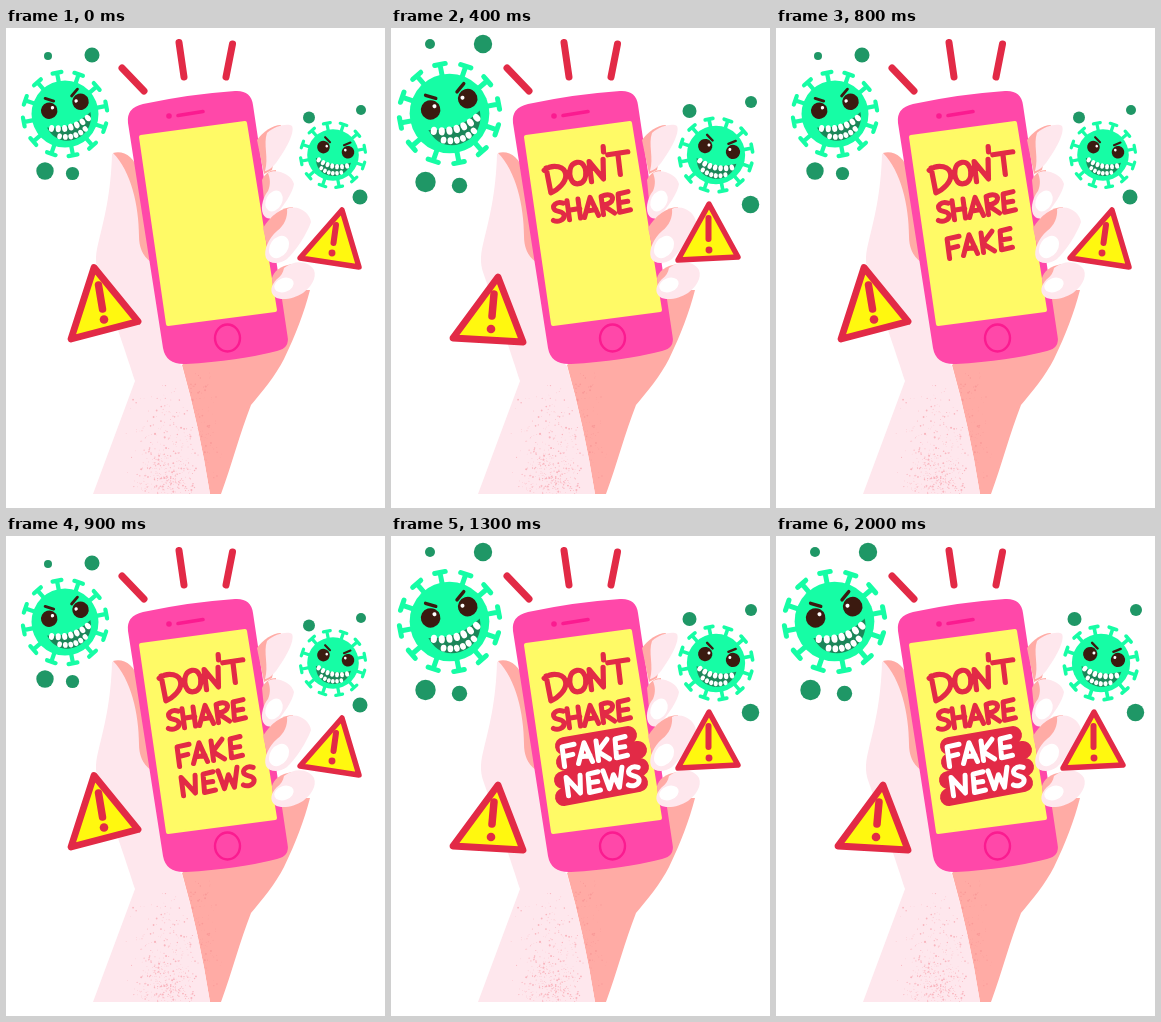
An HTML page with a canvas that plays this animation: 379 by 480 pixels, repeating every 2.4 s.

```html
<!DOCTYPE html>
<html lang="en">
<head>
<meta charset="utf-8">
<title>Don't share fake news</title>
<style>
html, body { margin: 0; width: 100%; height: 100%; overflow: hidden; background: #fff; }
canvas { display: block; width: 100vw; height: 100vh; }
</style>
</head>
<body>
<canvas id="stage" width="379" height="480" role="img" aria-label="Don't share fake news"></canvas>
<script>
const ctx = document.getElementById('stage').getContext('2d');
const LOOP = 2400, POSE = 400;
const RED = '#e22a46', PINK = '#ff48a9', HOT = '#fb1b90', YELLOW = '#fffa66',
  SIGN = '#fff80f', LIGHT = '#fee7ed', SALMON = '#ffaba5', MINT = '#16fda5',
  GREEN = '#1f9766', BROWN = '#3b1a10', MOUTH = '#1b8659', WHITE = '#fff';

ctx.lineCap = ctx.lineJoin = 'round';

function fill(d, color) {
  ctx.fillStyle = color;
  ctx.fill(new Path2D(d));
}

function stroke(d, color, width) {
  ctx.strokeStyle = color;
  ctx.lineWidth = width;
  ctx.stroke(new Path2D(d));
}

function oval(x, y, rx, ry, color, turn = 0) {
  ctx.fillStyle = color;
  ctx.beginPath();
  ctx.ellipse(x, y, rx, ry, turn, 0, Math.PI * 2);
  ctx.fill();
}

const dot = (x, y, r, color) => oval(x, y, r, r, color);
const turn = degrees => ctx.rotate(degrees * Math.PI / 180);

function seeded(seed) {
  return () => (seed = (seed * 16807) % 2147483647) / 2147483647;
}

// Hand
const ARM = 'M106 126C110 123 118 128 124 142L150 240L162 325L176 338Q193 397 204 466H87L129 353C121 328 108 290 93 247C88 234 90 224 93 212C98 192 105 165 106 126Z';
const PALM = 'M176 337L270 262L304 262C298 285 290 306 278 331C270 347 256 364 245 377C234 405 226 436 215 466H204Q193 397 176 337Z';

function speckle(area, color, count, seed, place) {
  const rnd = seeded(seed);
  ctx.save();
  ctx.clip(new Path2D(area));
  for (let i = 0; i < count; i++) {
    const [x, y] = place(rnd);
    dot(x, y, 0.3 + 0.9 * rnd() * rnd(), color);
  }
  ctx.restore();
}

function drawHand() {
  fill(PALM, SALMON);
  fill(ARM, LIGHT);
  fill('M107 125C118 122 128 129 133 144C138 165 140 195 145 234C136 228 133 218 133 208C133 178 125 143 107 125Z', SALMON);
  speckle(ARM, '#f9b6bf', 420, 71, r => {
    const y = 355 + 111 * Math.sqrt(r());
    return [120 + 40 * (r() + r()), y];
  });
  speckle(PALM, '#f99a98', 90, 29, r => {
    const y = 345 + 105 * r();
    return [180 + (y - 345) * 0.23 + 32 * r() * r(), y];
  });
}

function drawFingers() {
  fill('M251 112C257 104 266 97 275 97L266 142L258 146Z', SALMON);
  fill('M261 105C269 97 283 95 286 98C289 104 281 120 270 135C265 141 261 143 259 143C263 130 257 116 261 105Z', LIGHT);

  fill('M256 152C259 145 265 142 270 142L268 168L258 172Z', SALMON);
  fill('M262 145C271 140 286 147 288 156C287 165 277 178 271 186C267 192 260 192 257 186C254 178 258 168 262 163C265 156 264 150 262 145Z', LIGHT);
  oval(268, 173, 8, 11, WHITE, 0.5);

  fill('M257 200C264 188 276 179 287 179L278 216L262 222Z', SALMON);
  fill('M281 181C292 176 304 185 305 194C301 206 289 224 281 231C273 237 263 236 260 230C257 222 263 210 271 203C278 198 282 189 281 181Z', LIGHT);
  oval(273, 219, 9, 12, WHITE, 0.6);

  fill('M266 250C268 243 274 238 286 236L278 256L267 264Z', SALMON);
  fill('M278 240C289 231 303 233 308 242C311 250 305 259 297 265C288 271 275 273 269 269C263 264 265 257 271 251C275 248 277 245 278 240Z', LIGHT);
  oval(278, 257, 10, 7, WHITE, -0.35);
}

function drawPhone() {
  const screen = 'M135 109L239 95L269 282L162 296Z';
  fill('M137 76Q184 66 229 63Q245 62 247 77L281.5 308Q284 320 271 323Q232 333 180 336Q160 337 157 320L122 95Q120 80 137 76Z', PINK);
  stroke(screen, YELLOW, 4);
  fill(screen, YELLOW);
  dot(163, 88, 2.8, HOT);
  stroke('M172 87.5L197 83.5', HOT, 3.6);
  ctx.lineWidth = 2.4;
  ctx.beginPath();
  ctx.ellipse(221.5, 310, 12.5, 13.5, 0, 0, Math.PI * 2);
  ctx.stroke();
  stroke('M116 40L138 63M173 14.5L178 49M226.5 16L220 49', RED, 7);
}

// Brush lettering, each glyph about 22 units tall
const GLYPHS = {
  D: 'M0 1L3 27M-2 3C8 -3 19 3 19 11C19 18 11 25 3 27',
  O: 'M8 0C2 0 0 6 0 11C0 17 3 22 8 22C14 22 16 16 16 11C16 5 13 0 8 0Z',
  N: 'M1 22L0 1L13 21L14 1',
  "'": 'M0 -12L0 -6.5',
  T: 'M-1 -3L19 -3M9 -3L10 19',
  S: 'M11 2C4 -2 -1 4 2 8C4 11 11 11 11 16C11 22 4 23 0 20',
  H: 'M0 0L1 22M11 0L12 22M1 11L12 11',
  A: 'M-1 22L6 0L13 22M2 15L11 15',
  R: 'M1 22L0 1C8 -2 12 2 11 6C10 10 5 11 1 11L12 22',
  E: 'M11 0L1 1L1 22L12 21M1 11L10 11',
  F: 'M12 0L0 1L1 23M1 12L10 11',
  K: 'M0 0L1 22M11 0L1 12L12 22',
  W: 'M0 0L5 21L10 6L15 21L19 -1'
};
const SLOPE = -0.15;

function word(text, y, tall, xs) {
  const path = new Path2D();
  xs.forEach((x, i) => {
    const m = new DOMMatrix([1, SLOPE, 0.07, tall, x, y + SLOPE * (x - xs[0])]);
    path.addPath(new Path2D(GLYPHS[text[i]]), m);
  });
  return path;
}

const DONT = word("DON'T", 139, 0.97, [155, 178, 198, 213, 218]);
const SHARE = word('SHARE', 175, 0.87, [161, 176, 193, 210, 226]);
const FAKE = word('FAKE', 210, 0.9, [171, 187, 205, 223]);
const NEWS = word('NEWS', 240.5, 0.88, [175, 196, 212, 236]);

function drawText(t) {
  const marked = t >= 1300;
  const ink = marked ? WHITE : RED;
  if (marked) {
    stroke('M173 210L237 199M174 226L247 214M172 244L249 231M173 261L248 247', RED, 18);
  }
  if (t >= 200) {
    stroke(DONT, RED, 5.2);
    stroke(SHARE, RED, 5);
  }
  if (t >= 600) stroke(FAKE, ink, 5);
  if (t >= 900) stroke(NEWS, ink, 5);
}

function teeth(n, x0, x1, curve, rx, ry) {
  for (let i = 0; i < n; i++) {
    const u = (i + 0.5) / n, v = 2 * u - 1;
    oval(x0 + (x1 - x0) * u, curve(v), rx, ry, WHITE, -v * 0.5);
  }
}

function virus(x, y, scale, tilt) {
  ctx.save();
  ctx.translate(x, y);
  ctx.scale(scale, scale);
  for (let i = 0; i < 12; i++) {
    ctx.save();
    turn(19 + i * 30);
    stroke('M28 0L41 0M42 -4.5L42 4.5', MINT, 4.2);
    ctx.restore();
  }
  dot(0, 0, 33.5, MINT);

  turn(tilt);
  for (const side of [-1, 1]) {
    const ex = 2 + side * 16.3;
    dot(ex, -7.5, 8.2, BROWN);
    dot(ex - side * 4, -9.5, 1.7, WHITE);
    stroke(`M${ex + side * 0.5} -20.5L${ex - side * 7} -15.5`, BROWN, 2.8);
  }
  fill('M-21 8Q3 17 25 5C24 18 14 27 1 27C-11 27 -19 19 -21 8Z', MOUTH);
  teeth(7, -20, 24, v => 14.2 - 5.5 * v * v, 2.6, 3.5);
  teeth(6, -14, 18, v => 23.4 - 5 * v * v, 2.4, 2.9);
  ctx.restore();
}

function sign(triangle, bar, x, y, size) {
  fill(triangle, SIGN);
  stroke(triangle, RED, 6.8 * size);
  stroke(bar, RED, 7.5 * size);
  dot(x, y, 4.3 * size, RED);
}

const POSES = [
  {
    viruses: [[59, 86, 1, -16], [327, 127, 0.77, 12]],
    dots: [[42, 28, 4], [86, 27, 7.5], [39, 143, 8.7], [66.5, 145.5, 6.6],
      [303, 89.5, 6], [355, 82, 5], [354, 169, 7.5]],
    signs: [
      ['M88 239.5L132 293.5L65 311Z', 'M92.5 257L96.5 281', 98, 291.5, 1],
      ['M336 182L353 239L294 230Z', 'M330 197L327.5 215', 326, 225, 0.8]
    ]
  },
  {
    viruses: [[58.5, 85.5, 1.19, -17], [325, 127, 0.87, 12]],
    dots: [[39, 16, 5], [92, 16, 9.2], [34.5, 154, 10.2], [68.5, 157.5, 7.7],
      [298.5, 83, 7], [360, 74, 6], [359.5, 176.5, 8.7]],
    signs: [
      ['M107 249L132 314L62 310Z', 'M103 266L101 288', 100, 301, 1],
      ['M318 176L347 229L287 232Z', 'M317.5 190L317.5 211', 318, 222, 0.8]
    ]
  }
];

function draw(t) {
  const pose = POSES[Math.floor(t / POSE) % 2];
  ctx.fillStyle = WHITE;
  ctx.fillRect(0, 0, 379, 480);
  drawHand();
  drawPhone();
  drawFingers();
  drawText(t);
  pose.viruses.forEach(v => virus(...v));
  pose.dots.forEach(d => dot(...d, GREEN));
  pose.signs.forEach(s => sign(...s));
}

const start = performance.now();
function tick() {
  draw((performance.now() - start) % LOOP);
  requestAnimationFrame(tick);
}
tick();
</script>
</body>
</html>
```
